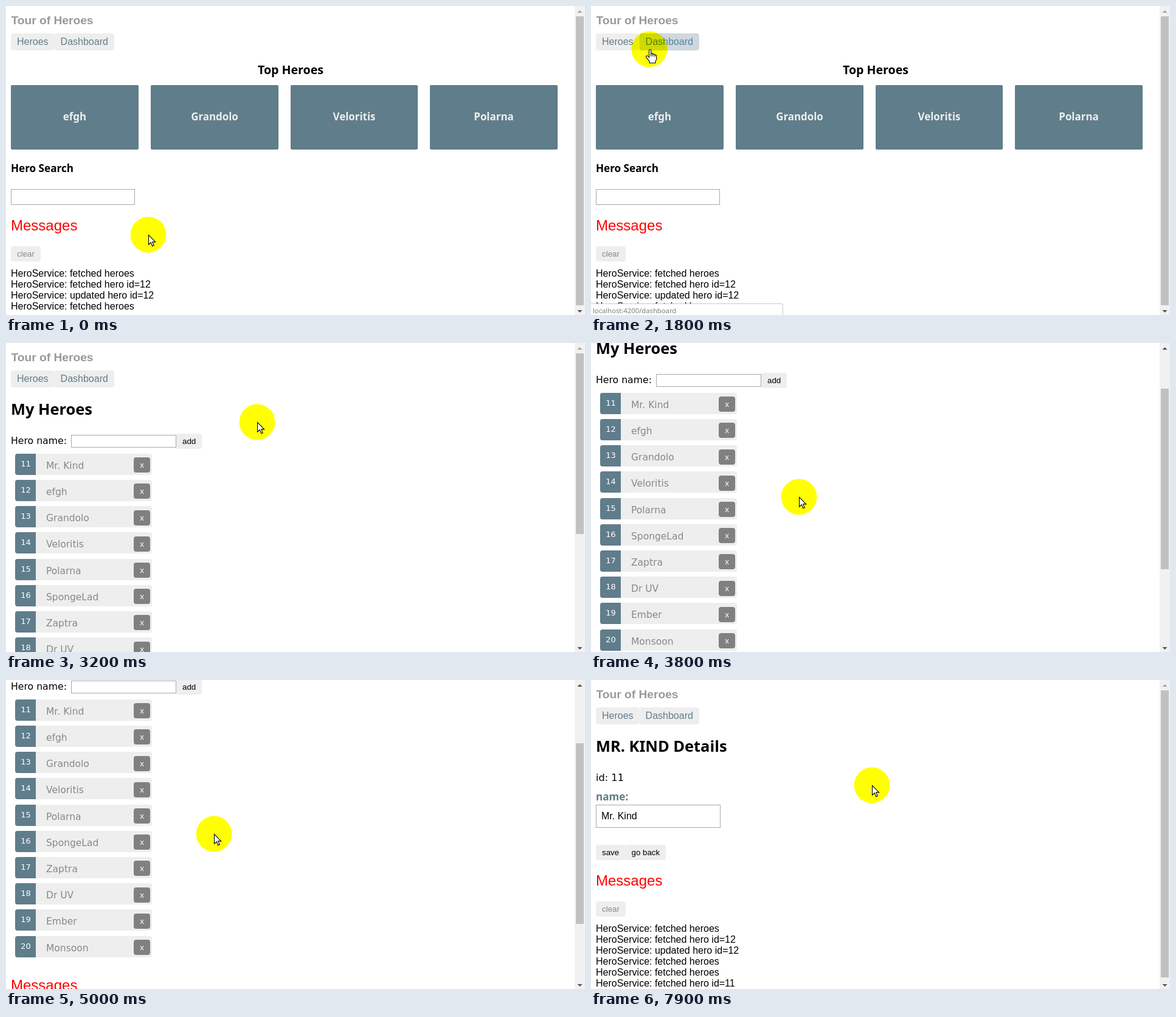
These frames come from a looping animation (952 px wide and 508 px high, 8000 ms). An HTML page with a canvas:

```html
<!DOCTYPE html>
<html lang="en">
<head>
<meta charset="utf-8">
<title>Tour of Heroes</title>
<style>
html, body { margin: 0; width: 100%; height: 100%; overflow: hidden; background: #fff; }
canvas { display: block; }
</style>
</head>
<body>
<canvas id="stage" width="952" height="508"></canvas>
<script>
const ctx = document.getElementById('stage').getContext('2d');
const W = 952, H = 508, LOOP = 8000, STEP = 100;

const ARIAL = '"Liberation Sans", Arial, sans-serif';
const WIDE = '"DejaVu Sans", Verdana, sans-serif';
const HEAD = '"Noto Sans", "Open Sans", sans-serif';
const UI = '"Open Sans", "Noto Sans", sans-serif';
const SLATE = '#607d8b', PALE = '#eee';

const HEROES = ['Mr. Kind', 'efgh', 'Grandolo', 'Veloritis', 'Polarna',
  'SpongeLad', 'Zaptra', 'Dr UV', 'Ember', 'Monsoon'];
const LOG = ['fetched heroes', 'fetched hero id=12', 'updated hero id=12',
  'fetched heroes', 'fetched heroes', 'fetched hero id=11'];
const TILES = [[8, 210], [238, 210], [468, 209], [697, 210]];
const NAV = [
  { label: 'Heroes', x: 8, w: 71.6, url: 'heroes' },
  { label: 'Dashboard', x: 79.6, w: 98.3, url: 'dashboard' }
];

// Pointer keys: time, x, y
const MOVES = [
  [0, 234, 376], [700, 108, 48], [900, 99, 72], [1750, 99, 72], [2100, 45, 61],
  [2550, 45, 61], [3100, 413, 130], [3200, 413, 130], [3500, 342, 253],
  [6000, 342, 253], [6500, 141, 117], [6900, 141, 117], [7500, 462, 170],
  [7800, 462, 170], [7900, 462, 173]
];
const CLICKS = [2200, 6700];
const WHEEL = [[3460, 100], [4060, 100], [4860, -100]];

const ROW_PITCH = 43.2, ROW_H = 35;

const clamp = u => Math.max(0, Math.min(1, u));
const smooth = u => Math.sin(clamp(u) * Math.PI / 2) ** 2;
const rowTop = i => Math.floor(182.3 + ROW_PITCH * i);
const deleteTop = i => Math.floor(188.7 + ROW_PITCH * i);
const pageAt = t => t < 2300 ? 'dashboard' : t < 6900 ? 'list' : 'detail';

function pointer(t) {
  for (let i = 1; i < MOVES.length; i++) {
    const [t0, x0, y0] = MOVES[i - 1], [t1, x1, y1] = MOVES[i];
    if (t < t1) {
      const u = smooth((t - t0) / (t1 - t0));
      return { x: Math.round(x0 + (x1 - x0) * u), y: Math.round(y0 + (y1 - y0) * u) };
    }
  }
  const [, x, y] = MOVES[MOVES.length - 1];
  return { x, y };
}

function scrollAt(t) {
  if (pageAt(t) !== 'list') return 0;
  return Math.round(WHEEL.reduce((sum, [start, dist]) => sum + dist * smooth((t - start) / 280), 0));
}

// The link below the pointer, or null
function linkAt(t) {
  const { x, y: py } = pointer(t), y = py + scrollAt(t), page = pageAt(t);
  const over = (left, top, w, h) => x >= left && x <= left + w && y >= top && y <= top + h;
  const nav = NAV.find(n => over(n.x, 45, n.w, 28));
  if (nav) return { kind: 'nav', id: nav.label, url: nav.url };
  if (page === 'dashboard') {
    const i = TILES.findIndex(([left, w]) => over(left, 130, w, 106));
    if (i >= 0) return { kind: 'tile', id: i, url: 'detail/' + (12 + i) };
  }
  if (page === 'list') {
    const i = HEROES.findIndex((_, n) => over(15, rowTop(n), 225, ROW_H));
    if (i >= 0) return { kind: 'row', id: i, url: 'detail/' + (11 + i) };
  }
  return null;
}

function text(s, x, y, font, color = '#000', align = 'left') {
  ctx.font = font;
  ctx.fillStyle = color;
  ctx.textAlign = align;
  ctx.fillText(s, x, y);
}

function box(x, y, w, h, color, radius = 0) {
  ctx.fillStyle = color;
  ctx.beginPath();
  ctx.roundRect(x, y, w, h, radius);
  ctx.fill();
}

function field(x, y, w, h) {
  ctx.strokeStyle = '#a9a9a9';
  ctx.lineWidth = 1;
  ctx.strokeRect(x + .5, y + .5, w - 1, h - 1);
}

function button(label, x, y, w, color = '#000') {
  box(x, y, w, 25, PALE, 4);
  text(label, x + 10, y + 17, '13.33px ' + ARIAL, color);
}

function header(hot) {
  text('Tour of Heroes', 8.5, 30, 'bold 19.2px ' + ARIAL, '#999');
  for (const n of NAV) {
    const on = hot && hot.id === n.label;
    box(n.x, 45, n.w, 28, on ? '#cfd8dc' : PALE, 4);
    text(n.label, n.x + 10, 64, '16px ' + ARIAL, on ? '#4d86a5' : SLATE);
  }
}

function messages(base, count) {
  text('Messages', 8, base, '24px ' + ARIAL, '#f00');
  button('clear', 8, base + 26, 49, '#888');
  LOG.slice(0, count).forEach((line, i) =>
    text('HeroService: ' + line, 8, base + 76 + 18 * i, '16px ' + ARIAL));
}

function dashboard(hot) {
  text('Top Heroes', 468, 112, 'bold 19.6px ' + HEAD, '#000', 'center');
  TILES.forEach(([x, w], i) => {
    const on = hot && hot.kind === 'tile' && hot.id === i;
    box(x, 130, w, 106, on ? PALE : SLATE, 2);
    text(HEROES[i + 1], x + w / 2, 188, 'bold 16.9px ' + HEAD, on ? SLATE : PALE, 'center');
  });
  text('Hero Search', 8, 273, 'bold 17.1px ' + HEAD);
  field(8, 301, 204, 26);
  messages(369, 4);
}

function list(hot) {
  text('My Heroes', 8, 118, 'bold 25.4px ' + HEAD);
  text('Hero name:', 8, 166, '15.7px ' + WIDE);
  field(107, 151, 173, 21);
  button('add', 280, 149, 42);
  HEROES.forEach((name, i) => {
    const on = hot && hot.kind === 'row' && hot.id === i;
    const x = on ? 17 : 15, y = rowTop(i), cross = deleteTop(i);
    box(x, y, 225, ROW_H, on ? '#ddd' : PALE, 4);
    box(x, y, 34, ROW_H, SLATE, [4, 0, 0, 4]);
    text(11 + i, x + 17.5, y + 21, '13px ' + WIDE, '#fff', 'center');
    text(name, x + 51, y + 25, '15.5px ' + WIDE, on ? SLATE : '#888');
    box(x + 195, cross, 27, 25, '#808080', 4);
    text('x', x + 208.5, cross + 17, '13.33px ' + ARIAL, '#fff', 'center');
  });
  messages(660, 5);
}

function detail() {
  text(HEROES[0].toUpperCase() + ' Details', 8, 118, 'bold 25.4px ' + HEAD);
  text('id: 11', 8, 166, '16.2px ' + WIDE);
  text('name:', 8, 198, 'bold 17.1px ' + HEAD, SLATE);
  field(8, 205, 205, 38);
  text(HEROES[0], 17, 229, '16px ' + ARIAL);
  button('save', 8, 271, 49);
  button('go back', 56.5, 271, 66.5);
  messages(338, 6);
}

function triangle(y, dir, color) {
  ctx.fillStyle = color;
  ctx.beginPath();
  ctx.moveTo(939.5, y);
  ctx.lineTo(947.5, y);
  ctx.lineTo(943.5, y + 4 * dir);
  ctx.fill();
}

function scrollbar(page, scroll) {
  const size = { dashboard: 475, list: 297, detail: 472 }[page];
  box(935, 0, 17, H, '#f1f1f1');
  box(937, 17 + Math.round(scroll * .58), 13, size, '#c1c1c1');
  triangle(11, -1, scroll ? '#505050' : '#a3a3a3');
  triangle(500, 1, '#505050');
}

function statusBar(url) {
  box(-4, 489, 320, 24, '#c8c8c8', [0, 4, 0, 0]);
  box(-4, 490, 319, 24, '#fff', [0, 3, 0, 0]);
  text('localhost:4200/' + url, 3, 505, '11.3px ' + UI, '#777');
}

const ARROW = new Path2D('M.5 .5V16.2L4.2 12.8L6.8 18.8L9.2 17.8L6.7 11.9H11.6Z');
const HAND = new Path2D('M-1.5 2Q-1.5 .5 0 .5Q1.7 .5 1.7 2V8Q2 7 3.4 7.1Q4.8 7.2 4.9 8.5' +
  'Q5.5 7.7 6.6 8Q7.9 8.3 8 9.6Q8.7 9 9.6 9.4Q10.7 9.9 10.7 11.4V15.5' +
  'Q10.5 18 8.8 20V22.8H-.8V20.4L-5.8 13.6Q-7 11.6-5.6 10.9Q-4.3 10.4-2.9 12L-1.5 13.6Z');
const KNUCKLES = new Path2D('M1.7 8V12M4.9 8.8V12M8 9.8V12.5');

function drawPointer(t, hot) {
  const { x, y } = pointer(t);
  ctx.save();
  ctx.translate(x, y);
  ctx.globalCompositeOperation = 'multiply';
  ctx.fillStyle = '#ff0';
  ctx.beginPath();
  ctx.arc(0, 0, 29.4, 0, 7);
  ctx.fill();
  ctx.globalCompositeOperation = 'source-over';

  const age = CLICKS.map(c => t - c).find(a => Math.abs(a) <= STEP);
  if (age !== undefined) {
    ctx.strokeStyle = '#e8101c';
    ctx.lineWidth = 3;
    ctx.beginPath();
    ctx.arc(.5, .5, 5.5 + age * .025, 0, 7);
    ctx.stroke();
  }

  const shape = hot ? HAND : ARROW;
  if (hot) ctx.translate(1, 0);
  ctx.fillStyle = '#fff';
  ctx.strokeStyle = '#000';
  ctx.lineWidth = 1.1;
  ctx.fill(shape);
  ctx.stroke(shape);
  if (hot) ctx.stroke(KNUCKLES);
  ctx.restore();
}

function draw(t) {
  const page = pageAt(t), scroll = scrollAt(t), hot = linkAt(t);
  box(0, 0, W, H, '#fff');
  ctx.save();
  ctx.translate(0, -scroll);
  header(hot);
  ({ dashboard, list, detail })[page](hot);
  ctx.restore();
  scrollbar(page, scroll);
  const shown = hot || linkAt(t - STEP);
  if (shown) statusBar(shown.url);
  drawPointer(t, hot);
}

// The screen is refreshed ten times a second
function tick() {
  const t = performance.now() % LOOP;
  draw(Math.floor(t / STEP) * STEP);
  requestAnimationFrame(tick);
}
tick();
</script>
</body>
</html>
```
